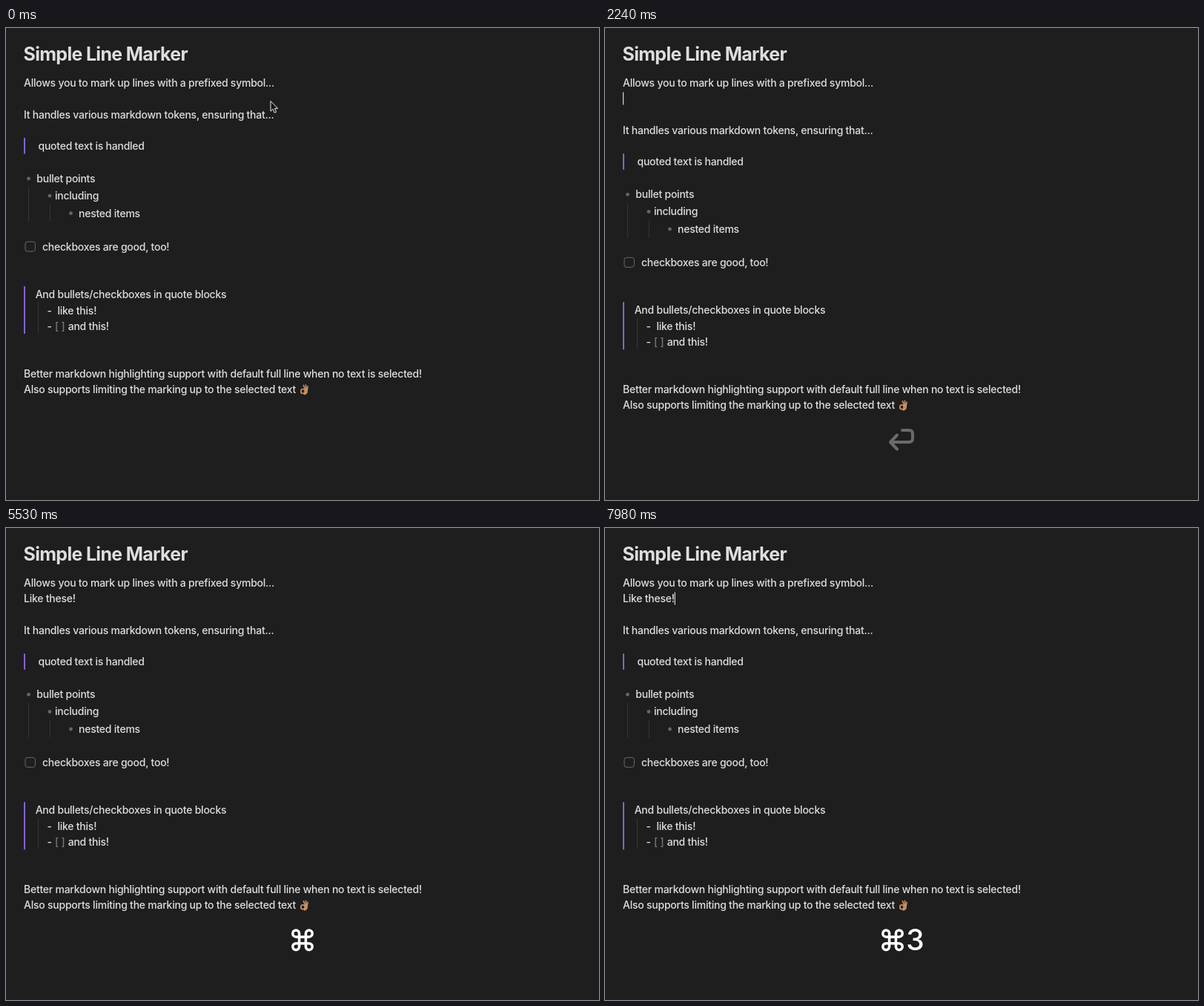
An HTML page for the animation above (8 s loop, 800x636 px).

```html
<!DOCTYPE html>
<html lang="en">
<head>
<meta charset="utf-8">
<title>Simple Line Marker</title>
<style>
  html, body { margin: 0; width: 100%; height: 100%; overflow: hidden; background: #1e1e1e; }
  svg { display: block; width: 100vw; height: 100vh; }
  text {
    font: 450 14px Inter, "Open Sans", sans-serif;
    font-optical-sizing: none;
    letter-spacing: -0.24px;
    white-space: pre;
    fill: #dedede;
  }
  #title { font-size: 25px; font-weight: 700; letter-spacing: -0.028em; }
  #digit { font-size: 39px; font-weight: 500; letter-spacing: 0; text-anchor: middle; fill: #fff; }
  .token { fill: #777; }
  .dot { fill: #666; }
  .bar { fill: #8364d6; }
  .guide { fill: #363636; }
  .key { fill: none; stroke: #fff; stroke-linecap: round; stroke-linejoin: round; }
</style>
</head>
<body>
<svg viewBox="0 0 800 636">
  <text id="title" x="23.5" y="44">Simple Line Marker</text>
  <text x="24" y="79">Allows you to mark up lines with a prefixed symbol...</text>
  <text id="typed" x="24" y="100.3"></text>

  <g id="body">
    <text x="24" y="121.5">It handles various markdown tokens, ensuring that...</text>

    <rect class="bar" x="24" y="148" width="2" height="21.5"/>
    <text x="43.5" y="164">quoted text is handled</text>

    <circle class="dot" cx="30.5" cy="203" r="2.4"/>
    <text x="41.3" y="208">bullet points</text>
    <rect class="guide" x="30" y="215" width="1" height="46"/>
    <circle class="dot" cx="59" cy="226.2" r="2.4"/>
    <text x="66" y="231">including</text>
    <rect class="guide" x="59" y="238" width="1" height="23"/>
    <circle class="dot" cx="87.5" cy="249.7" r="2.4"/>
    <text x="98" y="254.5">nested items</text>

    <rect x="26" y="288" width="13.4" height="13" rx="3" fill="none" stroke="#686868"/>
    <text x="49" y="299.5">checkboxes are good, too!</text>

    <rect class="bar" x="24" y="348" width="2" height="64"/>
    <rect class="guide" x="43" y="370" width="1" height="41"/>
    <text x="39.7" y="364">And bullets/checkboxes in quote blocks</text>
    <text x="55.5" y="385.5">-</text>
    <text x="69.5" y="385.5">like this!</text>
    <text x="55.5" y="407">-</text>
    <text class="token" x="66" y="407">[ ]</text>
    <text x="83.7" y="407">and this!</text>

    <text x="24" y="471">Better markdown highlighting support with default full line when no text is selected!</text>
    <text x="24" y="492">Also supports limiting the marking up to the selected text</text>
    <g fill="none" stroke="#c99064" stroke-linecap="round">
      <path d="M404 488L401.500 481.500M405 488L404.500 481M406 489L407 483" stroke-width="1.700"/>
      <path d="M405.500 489Q406 492 403 493" stroke-width="2.600"/>
      <ellipse cx="400.500" cy="489.500" rx="2.700" ry="3" stroke-width="1.700"/>
    </g>
  </g>

  <rect id="caret" width="1.2" height="17" fill="#d4d4d4"/>
  <path id="pointer" d="M0 0V13.700L3.100 10.800 5.200 15.700 7.600 14.700 5.500 9.900H9.700Z" fill="#151515" stroke="#eee"/>

  <path id="enter" class="key" stroke-width="4" d="M394 548.500L385 558 394 567.500M386 558H410Q415 558 415 553V547Q415 542 410 542H401"/>
  <g id="command">
    <path class="key" stroke-width="2.400" transform="translate(400 555.300) scale(1.470) translate(-12 -12)"
      d="M15 6v12a3 3 0 1 0 3-3H6a3 3 0 1 0 3 3V6a3 3 0 1 0-3 3h12a3 3 0 1 0-3-3"/>
    <text id="digit" x="430.5" y="569"></text>
  </g>
</svg>
<script>
const LOOP = 8000, ENTER = 2240, LINE = 21.3;
const part = id => document.getElementById(id);
const typed = part("typed"), digit = part("digit");

// Each pair is [time, value]; a value holds until the next time.
const keystrokes = [[0, ""], [2940, "L"], [3220, "Li"], [3360, "Lik"], [3500, "Like"], [3640, "Like "],
  [3710, "Like th"], [3850, "Like the"], [3990, "Like thes"], [4130, "Like these"], [4900, "Like these!"]];
const digits = [[0, ""], [5880, "1"], [6860, "2"], [7840, "3"]];
const caretShown = [[0, 0], [490, 1], [1010, 0], [1540, 1], [2100, 0], [ENTER, 1], [2730, 0], [2940, 1],
  [4620, 0], [4900, 1], [5500, 0], [5950, 1], [6500, 0], [6990, 1], [7560, 0], [7970, 1]];

const held = (steps, t) => steps.findLast(([start]) => t >= start)[1];
const ramp = (t, from, to) => Math.min(1, Math.max(0, (t - from) / (to - from)));
const smooth = p => p * p * (3 - 2 * p);
const move = (el, x, y) => el.setAttribute("transform", `translate(${x} ${y})`);

function draw(t) {
  const entered = t >= ENTER;
  typed.textContent = held(keystrokes, t);
  move(part("body"), 0, entered ? LINE : 0);

  const caretX = entered ? 24 + (typed.textContent ? typed.getComputedTextLength() : 0) : 357.5;
  move(part("caret"), caretX, entered ? 86.5 : 65.2);
  part("caret").style.opacity = held(caretShown, t);

  const travel = smooth(ramp(t, 0, 490));
  move(part("pointer"), 357 + 19 * travel, 98.5 - 26 * travel);
  part("pointer").style.opacity = entered ? 0 : 1;

  part("enter").style.opacity = entered ? ramp(t, 2170, 2380) * (1 - ramp(t, 3230, 3500)) : 0;
  part("command").style.opacity = ramp(t, 5400, 5530);
  digit.textContent = held(digits, t);
  move(part("command"), digit.textContent ? -12 : 0, 0);
}

function frame(now) {
  draw(now % LOOP);
  requestAnimationFrame(frame);
}
draw(0);
requestAnimationFrame(frame);
</script>
</body>
</html>
```
